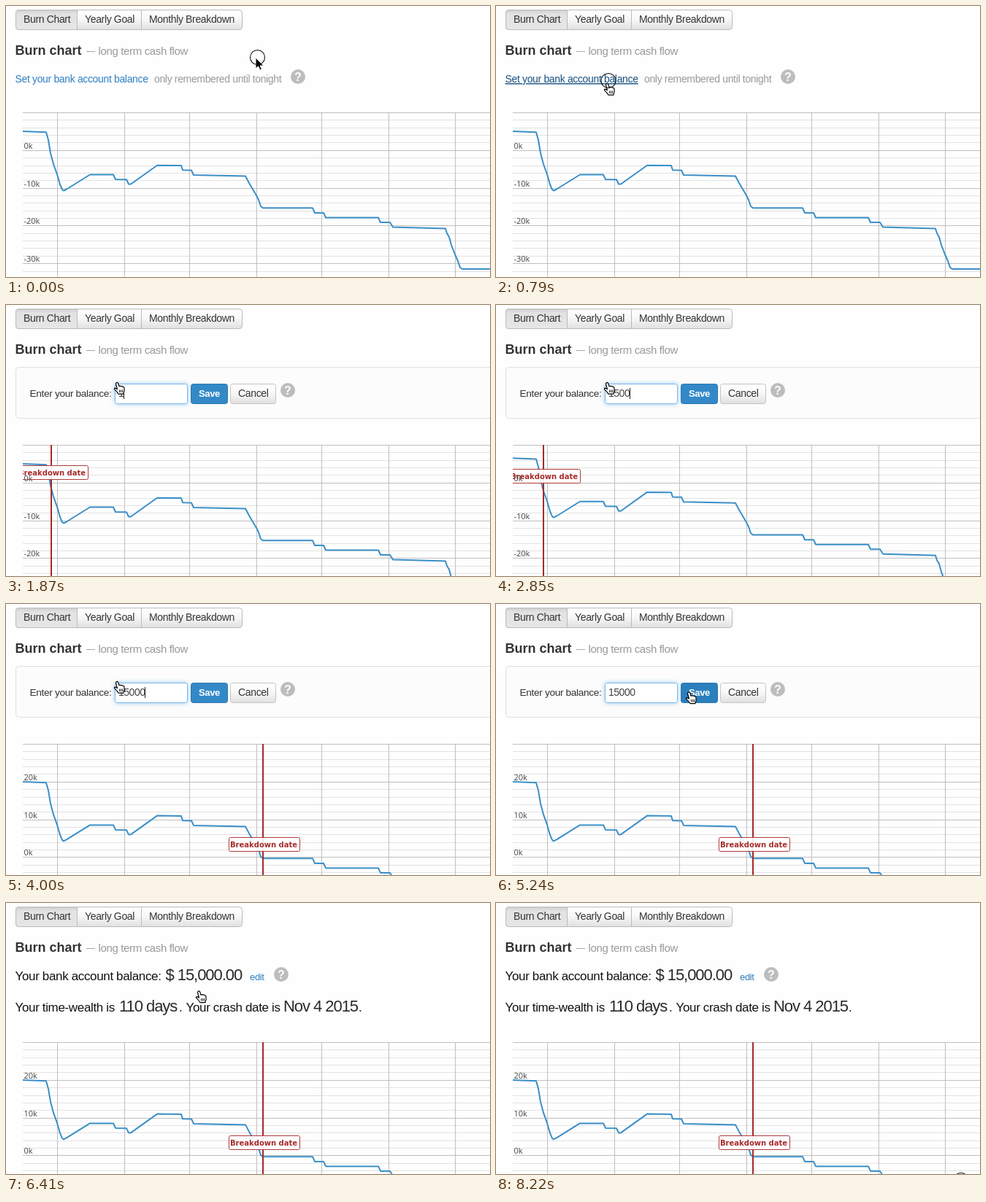
Recreate the animation shown at these times as an HTML page. Size 663x372 px, loop 8320 ms.

```html
<!DOCTYPE html>
<html lang="en">
<head>
<meta charset="utf-8">
<title>Burn chart</title>
<style>
  html, body { margin: 0; width: 100%; height: 100%; overflow: hidden; background: #fefefe; }
  svg { display: block; }
  text { font: 14px "Liberation Sans", Arial, sans-serif; letter-spacing: -.35px; fill: #333; white-space: pre; }
  .title { font-size: 18px; font-weight: bold; letter-spacing: 0; }
  .sub { font-size: 15px; fill: #999; }
  .dash { font-size: 12px; fill: #999; }
  .note { fill: #999; }
  .link { fill: #2f7fc1; }
  .link.hover { fill: #17507f; text-decoration: underline; }
  .edit { font-size: 13px; fill: #2f7fc1; }
  .body { font-size: 17px; fill: #111; }
  .big { font-size: 22px; letter-spacing: -1.05px; fill: #2b2b2b; }
  .field { font-size: 13.7px; }
  .value { letter-spacing: -.48px; fill: #444; }
  .save { font-size: 13px; font-weight: bold; fill: #fff; }
  .q { font-size: 16px; font-weight: bold; fill: #fff; letter-spacing: 0; text-anchor: middle; }
  .tick { font: 11px "Open Sans", sans-serif; letter-spacing: 0; fill: #444; }
  .flag { font: bold 10px "DejaVu Sans", sans-serif; letter-spacing: 0; fill: #a52a2a; }
  .glow { filter: drop-shadow(0 0 3px rgba(82, 168, 236, .6)); }
</style>
</head>
<body>
<svg width="663" height="372" viewBox="0 0 663 372">
  <defs>
    <linearGradient id="grey" x1="0" y1="0" x2="0" y2="1">
      <stop offset="0" stop-color="#fff"/><stop offset=".45" stop-color="#f8f8f8"/><stop offset="1" stop-color="#e0e0e0"/>
    </linearGradient>
    <linearGradient id="pressed" x1="0" y1="0" x2="0" y2="1">
      <stop offset="0" stop-color="#cfcfcf"/><stop offset=".2" stop-color="#e2e2e2"/><stop offset="1" stop-color="#e6e6e6"/>
    </linearGradient>
    <clipPath id="plot"><rect x="23" y="140" width="640" height="240"/></clipPath>
    <g id="help"><circle r="10" fill="#bdbdbd"/><text class="q" y="5.8">?</text></g>
  </defs>

  <g stroke="#bbb">
    <rect x="13.5" y="5.5" width="310" height="27" rx="4" fill="url(#grey)"/>
    <path d="M97.5 5.5H17.5a4 4 0 0 0-4 4V28.5a4 4 0 0 0 4 4H97.5Z" fill="url(#pressed)"/>
    <path d="M185.5 5.5V32.5"/>
  </g>
  <text x="24" y="23">Burn Chart</text>
  <text x="108" y="23">Yearly Goal</text>
  <text x="196" y="23">Monthly Breakdown</text>
  <text class="title" x="12.5" y="67">Burn chart</text>
  <text class="dash" x="110" y="66">—</text>
  <text class="sub" x="126.5" y="67">long term cash flow</text>

  <g id="intro">
    <text id="link" class="link" x="12.5" y="105">Set your bank account balance</text>
    <text class="note" x="203" y="105">only remembered until tonight</text>
    <use href="#help" x="400" y="97"/>
  </g>

  <g id="form">
    <rect x="13.5" y="85.5" width="670" height="70" rx="4" fill="#fcfcfc" stroke="#e0e0e0"/>
    <text class="field" x="32.5" y="126">Enter your balance:</text>
    <rect class="glow" x="149.5" y="108.5" width="99" height="27" rx="3" fill="#fff" stroke="#7db8e6"/>
    <text id="value" class="value" x="154" y="126"></text>
    <rect id="caret" y="114" width="1" height="15" fill="#222"/>
    <rect id="save" x="253.5" y="108.5" width="50" height="27" rx="3" stroke="#2b78b3"/>
    <text class="save" x="264" y="126">Save</text>
    <rect x="307.5" y="108.5" width="62" height="27" rx="3" fill="url(#grey)" stroke="#c4c4c4"/>
    <text x="318" y="126">Cancel</text>
    <use href="#help" x="386" y="117"/>
  </g>

  <g id="result">
    <text class="body" x="12.5" y="106">Your bank account balance:</text>
    <text class="big" x="218.5" y="106">$ 15,000.00</text>
    <text class="edit" x="334" y="106">edit</text>
    <use href="#help" x="377" y="98"/>
    <text class="body" x="12.5" y="149">Your time-wealth is</text>
    <text class="big" x="155" y="149">110 days</text>
    <text class="body" x="237" y="149">.</text>
    <text class="body" x="246.5" y="149">Your crash date is</text>
    <text class="big" x="380" y="149">Nov 4 2015</text>
    <text class="body" x="483" y="149">.</text>
  </g>

  <g id="chart" clip-path="url(#plot)">
    <g id="grid" fill="none"></g>
    <path id="curve" fill="none" stroke="#3a8fc8" stroke-width="2" stroke-linejoin="round"/>
    <g id="marker">
      <rect x="-1" y="146" width="2" height="240" fill="#a52a2a"/>
      <g id="flag">
        <rect x="-46.5" y=".5" width="97" height="19" rx="2" fill="#fff" fill-opacity=".9" stroke="#b03a3a"/>
        <text class="flag" x="-45" y="14">Breakdown date</text>
      </g>
    </g>
    <g id="ticks"></g>
  </g>

  <g id="cursor" stroke-linejoin="round">
    <path id="arrow" d="M0 0V15L3.5 11.8 6 17 8.4 16 6.1 11H10.8Z" fill="#000" stroke="#fff"/>
    <g id="hand" transform="translate(-4.5 -.5)" stroke="#000" stroke-width="1.2">
      <path fill="#fff" d="M3.5 1.5Q4.8.2 6 1.6L7.6 6.2Q9 5 10 6.2 11.5 5.4 12.4 6.8 14 6.4 14.4 8.2L14.6 12Q13.8 14 13.4 16.7H6.5Q4.8 13.6 1.2 10.4.3 8.8 2 8.6 3.6 8.8 4.9 10L3 3Q2.8 2 3.5 1.5Z"/>
      <path stroke-width=".9" d="M8 11V14.5M10 11V14.5M12 11V14.5"/>
    </g>
    <path id="beam" d="M-2.5-7.5Q0-7.5 0-6V6Q0 7.5-2.5 7.5M2.5-7.5Q0-7.5 0-6M0 6Q0 7.5 2.5 7.5" fill="none" stroke="#222"/>
  </g>
  <circle id="ring" r="10" fill="none" stroke="#111" stroke-width="1.1"/>
</svg>

<script>
const LOOP = 8320, TOP = 146.5, MAJOR = 51.8;
const OPEN = 970, SAVED = 5330;
const $ = id => document.getElementById(id);
const show = (id, on) => $(id).style.display = on ? '' : 'none';

const line = [
  [23, 172], [55, 173.3], [58, 184], [61, 202], [65, 217], [70, 231], [74, 245], [77, 252], [79, 253.5], [83, 251.5],
  [115, 231.5], [147, 231.5], [150, 238], [165, 238.3], [168, 244.5], [171, 244.5], [207, 218.7], [240, 219],
  [242, 225.3], [254, 225.6], [257, 232], [328, 233.5], [333, 243], [343, 260], [346, 266], [349, 275], [352, 277.3],
  [420, 277.3], [423, 284], [435, 284], [438, 290.5], [510, 290.5], [513, 297], [526, 297], [530, 303.5],
  [602, 305.5], [604, 312], [607, 317], [610, 328], [615, 341], [619, 350], [622, 359], [625, 361], [663, 361]
];
$('curve').setAttribute('d', 'M' + line.join('L'));

// start, typed text, marker x, flag top (relative to the plot), zero line shift in majors
const typing = [
  [0, '', 0, 0, 0],
  [1870, '1', 62, 174, 0],
  [2050, '15', 62, 174, 0],
  [2500, '150', 62, 174, 0],
  [2770, '1500', 65, 179, 0],
  [3020, '15000', 352, 274, 2]
];

// start, x, y, shape
const pointer = [
  [0, 342, 71, 'arrow'], [90, 330, 73, 'arrow'], [180, 286, 82, 'arrow'], [270, 226, 92, 'arrow'],
  [350, 178, 101, 'hand'], [430, 159, 105, 'hand'], [520, 152, 106, 'hand'],
  [4450, 154, 109, 'beam'], [4540, 159, 115, 'beam'], [4630, 169, 118, 'beam'], [4715, 185, 120, 'beam'],
  [4800, 206, 121, 'beam'], [4890, 228, 122, 'beam'], [4980, 245, 121, 'beam'], [5065, 256, 120, 'hand'],
  [5150, 262, 120, 'hand'], [5240, 264, 120.5, 'hand'],
  [6500, 338, 168, 'arrow'], [6590, 588, 352, 'arrow'], [6670, 0, 0, ''],
  [6940, 640, 196, 'arrow'], [7030, 630, 352, 'arrow'], [7120, 0, 0, '']
];

// start, end, x, y
const rings = [[0, 90, 344.5, 70.5], [790, OPEN, 154, 102.5], [8160, LOOP, 637, 380.5]];

const at = (table, t) => table.findLast(row => row[0] <= t);

function drawGrid() {
  let minor = '', major = '';
  for (let i = 0; i < 25; i++) {
    const d = `M23 ${Math.floor(TOP + i * MAJOR / 5) + .5}H663`;
    if (i % 5) minor += d; else major += d;
  }
  for (const x of [70, 162, 251, 343, 432, 524, 615]) major += `M${x + .5} 146V392`;
  $('grid').innerHTML = `<path d="${minor}" stroke="#e2e2e2"/><path d="${major}" stroke="#bfbfbf"/>`;
  for (let k = 1; k < 5; k++)
    $('ticks').innerHTML += `<text class="tick" x="24.5" y="${Math.floor(TOP + k * MAJOR) - 2}"></text>`;
}

function draw(t) {
  const form = t >= OPEN && t < SAVED;
  const [, text, markX, flagY, shift] = at(typing, t);
  const [, px, py, shape] = at(pointer, t);

  show('intro', t < OPEN);
  show('form', form);
  show('result', t >= SAVED);
  $('link').classList.toggle('hover', t >= 350 && t < OPEN);

  $('value').textContent = text;
  $('caret').setAttribute('x', Math.floor(154 + 7.3 * text.length));
  show('caret', t >= 1870 && t < 3560 || t >= 4000 && t < 4450);
  $('save').setAttribute('fill', t >= 5065 ? '#2a7fbd' : '#3389c7');

  // the plot sits lower while the form or the summary is above it
  const drop = t < OPEN ? 0 : form ? 46 : 45;
  for (const id of ['grid', 'ticks']) $(id).setAttribute('transform', `translate(0 ${drop})`);
  const rise = (shift - text / 10000) * MAJOR;
  $('curve').setAttribute('transform', `translate(0 ${drop + rise})`);
  show('marker', text);
  $('marker').setAttribute('transform', `translate(${markX} ${drop})`);
  $('flag').setAttribute('transform', `translate(0 ${flagY})`);
  [...$('ticks').children].forEach((tick, i) => {
    const n = (shift - i) * 10;
    tick.textContent = n + 'k';
  });

  for (const id of ['arrow', 'hand', 'beam']) show(id, id === shape);
  $('cursor').setAttribute('transform', `translate(${px} ${py})`);
  const ring = rings.find(r => t >= r[0] && t < r[1]);
  show('ring', ring);
  if (ring) $('ring').setAttribute('transform', `translate(${ring[2]} ${ring[3]})`);
}

function tick() {
  draw(performance.now() % LOOP);
  requestAnimationFrame(tick);
}

drawGrid();
tick();
</script>
</body>
</html>
```
